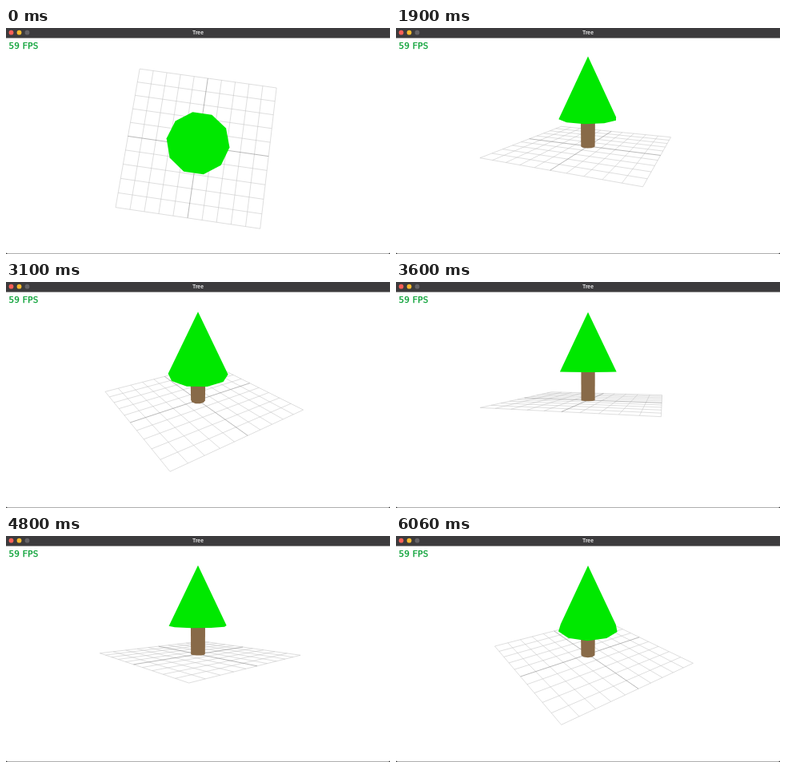
An HTML page that plays this animation: 480x283 px, repeating every 6.22 s.

```html
<!DOCTYPE html>
<html lang="en">
<head>
<meta charset="utf-8">
<title>Tree</title>
<style>
  html, body { margin: 0; width: 100%; height: 100%; overflow: hidden; background: #fff; }
  svg { display: block; width: 100%; height: 100%; }
  .title { font: 700 6.4px Inter, Roboto, sans-serif; fill: #e8e8e8; text-anchor: middle; }
  .fps { font: 11px "DejaVu Sans Mono", monospace; word-spacing: -3px; fill: #009e2f; stroke: #009e2f; stroke-width: .25; }
  .lines { fill: none; stroke: #c2c2c2; stroke-width: .55; }
  .axes { fill: none; stroke: #8a8a8a; stroke-width: .6; }
</style>
</head>
<body>
<svg viewBox="0 0 480 283">
  <rect width="480" height="283" fill="#fff"/>
  <g id="scene">
    <g id="grid"><path id="lines" class="lines"/><path id="axes" class="axes"/></g>
    <path id="trunk" fill="#886a48"/>
    <path id="crown" fill="#00e800"/>
  </g>
  <rect width="480" height="12.6" fill="#3c3b3d"/>
  <circle cx="6.5" cy="5.7" r="2.9" fill="#ff5f57"/>
  <circle cx="16.5" cy="5.7" r="2.9" fill="#febc2e"/>
  <circle cx="26.5" cy="5.7" r="2.9" fill="#656366"/>
  <text class="title" x="240" y="8">Tree</text>
  <text class="fps" x="3.6" y="26">59 FPS</text>
  <rect y="282.3" width="480" height=".7" fill="#8c8c8c"/>
  <path d="M0 280.5V283H2.5Q0 283 0 280.5ZM480 280.5V283H477.5Q480 283 480 280.5Z"/>
</svg>
<script>
const LOOP = 6220, STEP = 100;
const CX = 240, CY = 148, FOCAL = 325.9, DIST = 18.36;
const RAD = Math.PI / 180;

// [time in ms, degrees]
const TURN = [[1745, -8.2], [2600, -95.5], [3600, -196], [4400, -276.5], [5300, -370.4], [5740, -415.2]];
const TILT = [[0, 84], [150, 89.4], [697, 89.4], [1100, 49], [1422, 16.5], [2800, 16.5], [2925, 29],
  [3382, 29], [3600, 7.2], [3783, -11.3], [4447, -11.3], [4661, 10.3], [5680, 10.3], [5860, 28.5]];

const $ = id => document.getElementById(id);

function track(keys, t) {
  if (t <= keys[0][0]) return keys[0][1];
  for (let i = 1; i < keys.length; i++) {
    const [t0, v0] = keys[i - 1], [t1, v1] = keys[i];
    if (t < t1) return v0 + (v1 - v0) * (t - t0) / (t1 - t0);
  }
  return keys[keys.length - 1][1];
}

// Orbit camera looking at the world's centre.
function camera(turn, tilt) {
  const ca = Math.cos(turn * RAD), sa = Math.sin(turn * RAD);
  const ce = Math.cos(tilt * RAD), se = Math.sin(tilt * RAD);
  return (x, y, z) => {
    const right = x * ca - z * sa, away = x * sa + z * ca;
    const k = FOCAL / (DIST + away * ce - y * se);
    return [CX + right * k, CY - (y * ce + away * se) * k];
  };
}

const join = pts => "M" + pts.map(p => p[0].toFixed(2) + " " + p[1].toFixed(2)).join("L");

function ring(view, radius, y) {
  return Array.from({ length: 10 }, (_, i) =>
    view(radius * Math.cos(i * 36 * RAD), y, radius * Math.sin(i * 36 * RAD)));
}

function hull(pts) {
  const sorted = [...pts].sort((a, b) => a[0] - b[0] || a[1] - b[1]);
  const chain = list => {
    const out = [];
    for (const p of list) {
      while (out.length > 1) {
        const [a, b] = out.slice(-2);
        if ((b[0] - a[0]) * (p[1] - a[1]) - (b[1] - a[1]) * (p[0] - a[0]) > 0) break;
        out.pop();
      }
      out.push(p);
    }
    return out.slice(0, -1);
  };
  return [...chain(sorted), ...chain(sorted.reverse())];
}

function cross(view, i) {
  return join([view(i, 0, -5), view(i, 0, 5)]) + join([view(-5, 0, i), view(5, 0, i)]);
}

function draw(time) {
  const t = Math.floor(time / STEP) * STEP;
  const tilt = track(TILT, t);
  const view = camera(track(TURN, t), tilt);
  let lines = "";
  for (let i = -5; i <= 5; i++) if (i) lines += cross(view, i);
  $("lines").setAttribute("d", lines);
  $("axes").setAttribute("d", cross(view, 0));
  $("trunk").setAttribute("d", join(hull([...ring(view, .5, 0), ...ring(view, .5, 2)])) + "Z");
  $("crown").setAttribute("d", join(hull([...ring(view, 2, 2), view(0, 6, 0)])) + "Z");
  // Seen from below, the ground is nearest and the crown farthest.
  const order = tilt < 0 ? ["crown", "trunk", "grid"] : ["grid", "trunk", "crown"];
  if ($("scene").firstElementChild.id !== order[0]) $("scene").append(...order.map($));
}

const start = performance.now();
function tick() {
  draw((performance.now() - start) % LOOP);
  requestAnimationFrame(tick);
}
tick();
</script>
</body>
</html>
```
